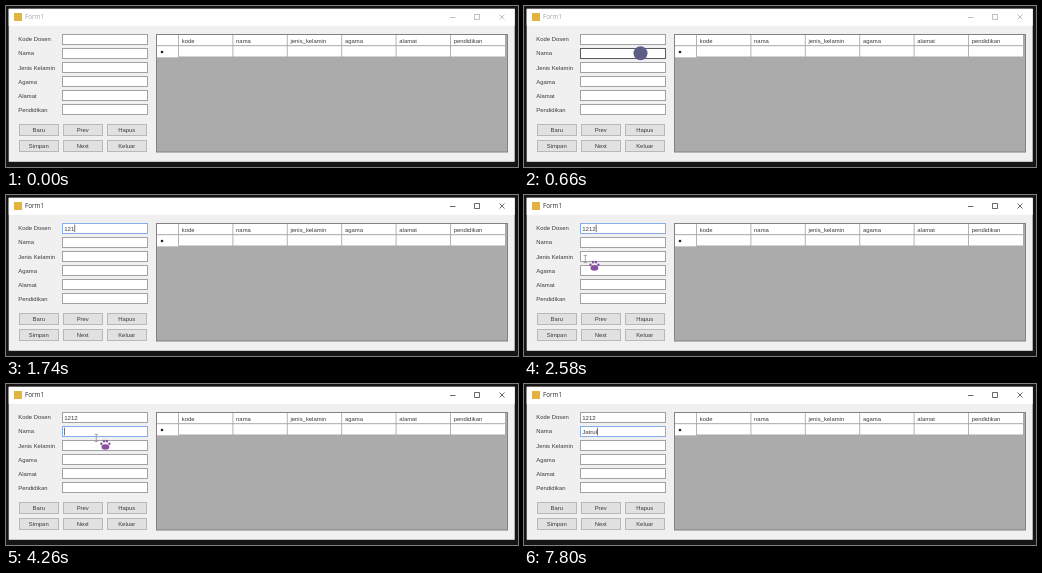
An HTML page for the animation above (8 s loop, 512 px wide and 161 px high).

```html
<!DOCTYPE html>
<html lang="id">
<head>
<meta charset="utf-8">
<title>Form1</title>
<style>
  html, body { margin: 0; width: 100%; height: 100%; overflow: hidden; background: #171416; }
  svg { display: block; width: 100vw; height: 100vh; }
  text { font: 5.9px "Liberation Sans", Arial, sans-serif; fill: #3a3a3a; }
  text.title { font: 6.3px "Open Sans", sans-serif; }
  text.entry { font-size: 6.1px; }
</style>
</head>
<body>
<svg id="stage" viewBox="0 0 512 161"></svg>
<script>
const stage = document.getElementById('stage');
const LOOP = 8000, TICK = 60;

function add(tag, attrs, parent = stage) {
  const el = document.createElementNS('http://www.w3.org/2000/svg', tag);
  for (const key in attrs) el.setAttribute(key, attrs[key]);
  return parent.appendChild(el);
}
const box = (x, y, width, height, fill, stroke = 'none') =>
  add('rect', { x, y, width, height, fill, stroke });
const line = (d, stroke, width = 1, parent = stage) =>
  add('path', { d, stroke, fill: 'none', 'stroke-width': width }, parent);
function label(string, x, y, attrs = {}) {
  const el = add('text', { x, y, ...attrs });
  el.textContent = string;
  return el;
}

// Window
box(0, 0, 512, 161, '#171416');
box(2.7, 2.8, 506, 153, '#f0f0f0');
box(2.7, 2.8, 506, 17, '#fff');
box(8, 7, 8, 8, '#e3b341');
const title = label('Form1', 19, 13.4, { class: 'title' });
const controls = line('M444 11.5H449.5M468.5 8.5H473.5V13.5H468.5ZM493.5 8.5L498.5 13.5M498.5 8.5L493.5 13.5', '#999', 0.7);

// Input fields
const fields = ['Kode Dosen', 'Nama', 'Jenis Kelamin', 'Agama', 'Alamat', 'Pendidikan'].map((name, i) => {
  const y = 28 + 14.1 * i;
  label(name, 12.3, y + 7.3);
  return {
    y,
    frame: box(56.5, Math.floor(y) + 0.5, 85, 10, '#fff'),
    text: label('', 58.2, y + 7.6, { class: 'entry' })
  };
});

// Buttons
['Baru', 'Prev', 'Hapus', 'Simpan', 'Next', 'Keluar'].forEach((name, i) => {
  const x = 13.5 + 44 * (i % 3), y = i < 3 ? 118.5 : 134.5;
  box(x, y, 39, 11, '#e1e1e1', '#b8b8b8');
  label(name, x + 19.2, y + 7.8, { 'text-anchor': 'middle' });
});

// Data grid
box(150.5, 28.5, 351, 117.5, '#ababab', '#828282');
box(151, 29, 348.5, 22, '#fff');
['kode', 'nama', 'jenis_kelamin', 'agama', 'alamat', 'pendidikan'].forEach((name, i) => {
  const x = 172.5 + 54.4 * i;
  line(`M${x} 29V51`, '#b4b4b4');
  label(name, x + 3.2, 36.6);
});
line('M151 39.7H499.5V29M172.5 51H499.5V40', '#a8a8a8');
line('M151 51.5H172.5', '#c8c8c8');
add('circle', { cx: 156, cy: 46, r: 1.3, fill: '#222' });

// Caret and pointers
const caret = add('rect', { width: 0.8, height: 7.6, fill: '#555' });
const pointer = add('g', {});
const ball = add('circle', { cx: 8, cy: 7.3, r: 7, fill: '#5e5d86' }, pointer);
const beam = add('g', {}, pointer);
line('M-1.4 .4H2M.3 .4V7.6M-1.4 7.6H2', '#888', 0.7, beam);
const paw = add('g', { fill: '#84509f' }, beam);
add('ellipse', { cx: 9.4, cy: 13, rx: 3.9, ry: 2.7 }, paw);
[[5.4, 9.8], [8, 7.2], [10.9, 7.2], [13.4, 9.8]].forEach(([cx, cy]) =>
  add('ellipse', { cx, cy, rx: 1.1, ry: 1.4 }, paw));

// Pointer travel as [time, x, y]
const visits = [
  { end: 1380, keys: [[120, 2, 152], [360, 70, 98], [540, 106, 51], [660, 108.5, 40], [780, 107, 36], [900, 107, 35]] },
  { end: 5880, keys: [[2280, 104, 36], [2460, 20, 62], [2520, 40, 64], [2580, 61, 60], [2700, 84, 53], [2820, 90, 50]] }
];
// The caret toggles at each time in blinks
const entries = [
  { value: '1212', typed: [1380, 1500, 1740, 1920], focus: 900, fade: 120, blur: 2820,
    blinks: [900, 1920, 2280, 2820] },
  { value: 'Jatrul', typed: [5880, 6240, 6420, 6840, 6900, 7800], focus: 3000, fade: 240, blur: LOOP,
    blinks: [3180, 3720, 4260, 4740, 5280, 5760, 5880, 7440, 7800] }
];
const IDLE = [162, 162, 162], HOT = [92, 92, 96], FOCUS = [136, 172, 230];

const passed = (times, t) => times.filter(time => time <= t).length;
const clamp = v => Math.max(0, Math.min(1, v));
const mix = (a, b, p) => `rgb(${a.map((v, i) => Math.round(v + (b[i] - v) * p))})`;

function pointerAt(t) {
  const visit = visits.find(v => t >= v.keys[0][0] && t < v.end);
  if (!visit) return null;
  const { keys } = visit;
  const i = passed(keys.map(k => k[0]), t) - 1;
  const [t0, x0, y0] = keys[i], [t1, x1, y1] = keys[i + 1] || [t0 + 1, x0, y0];
  const p = (t - t0) / (t1 - t0);
  return { x: x0 + (x1 - x0) * p, y: y0 + (y1 - y0) * p };
}
const inside = (pos, field) => pos && pos.x >= 56 && pos.x <= 142 && pos.y >= field.y && pos.y <= field.y + 11;
const show = (el, on) => el.setAttribute('visibility', on ? 'inherit' : 'hidden');

function draw(t) {
  const ink = t >= 840 ? '#2a2a2a' : '#a4a4a4';
  title.style.fill = ink;
  controls.setAttribute('stroke', ink);

  // Hover borders lag two ticks behind the pointer
  const pos = pointerAt(t), earlier = pointerAt(t - 2 * TICK);
  pointer.setAttribute('visibility', pos ? 'visible' : 'hidden');
  if (pos) {
    const overField = fields.some(f => inside(pos, f));
    pointer.setAttribute('transform', `translate(${pos.x} ${pos.y})`);
    show(beam, overField);
    show(ball, !overField);
  }

  show(caret, false);
  fields.forEach((field, i) => {
    const entry = entries[i];
    const focus = entry && t < entry.blur ? clamp((t - entry.focus) / entry.fade) : 0;
    field.frame.setAttribute('stroke', mix(inside(earlier, field) ? HOT : IDLE, FOCUS, focus));
    if (!entry) return;
    field.text.textContent = entry.value.slice(0, passed(entry.typed, t));
    if (passed(entry.blinks, t) % 2) {
      caret.setAttribute('x', 58.2 + field.text.getComputedTextLength());
      caret.setAttribute('y', field.y + 1.6);
      show(caret, true);
    }
  });
}

const start = performance.now();
function frame() {
  const t = (performance.now() - start) % LOOP;
  draw(Math.floor(t / TICK) * TICK);
  requestAnimationFrame(frame);
}
frame();
</script>
</body>
</html>
```
